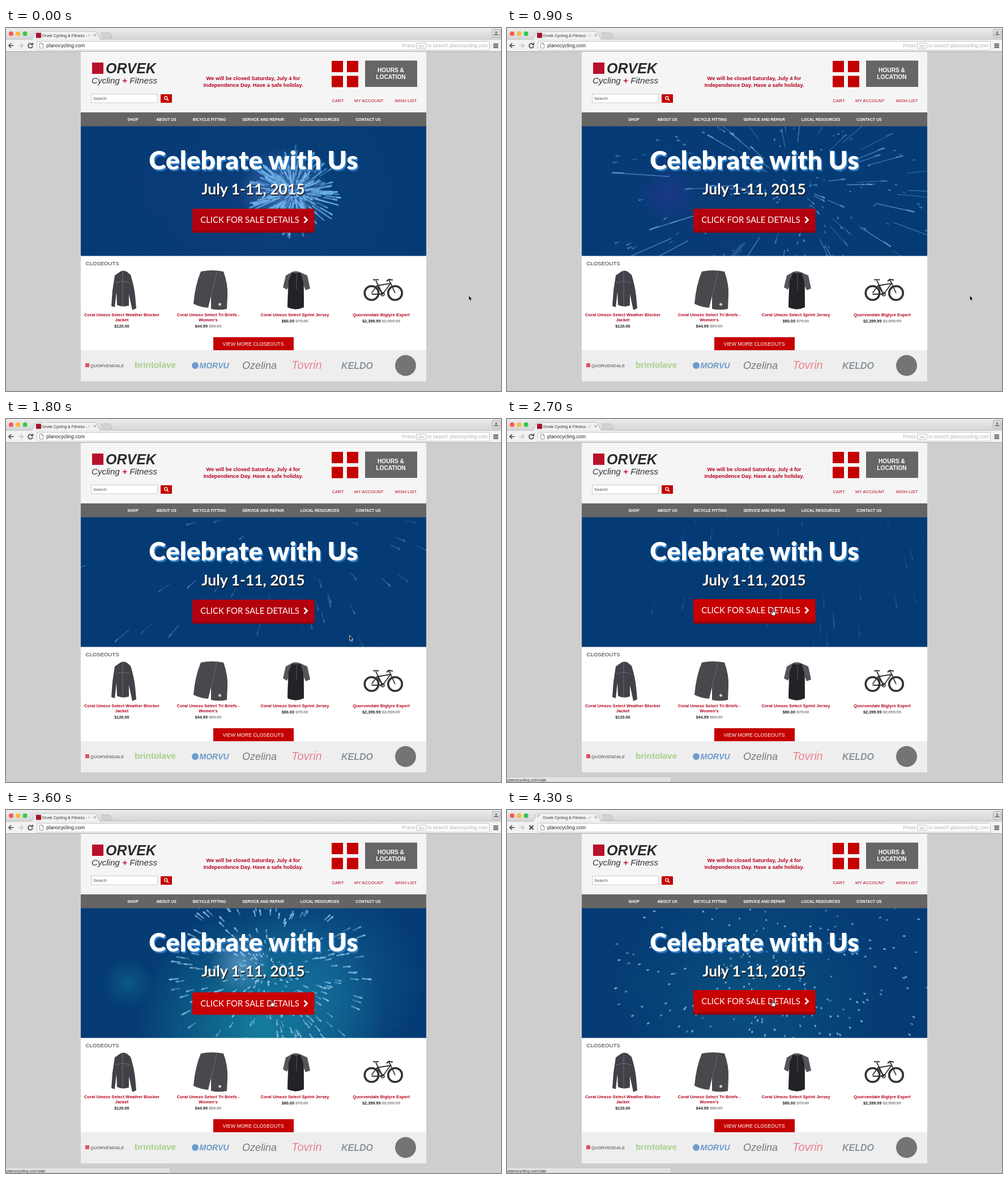
Write an HTML page with a canvas that moves like this. It is 874 px wide and 641 px high and loops after 4400 ms.

```html
<!DOCTYPE html>
<html lang="en">
<head>
<meta charset="utf-8">
<title>Orvek Cycling &amp; Fitness</title>
<style>
  html, body { margin: 0; width: 100%; height: 100%; overflow: hidden; background: #cecece; }
  canvas, svg { position: absolute; left: 0; top: 0; }
  canvas { left: 132px; top: 173px; }
  text { font-family: "Liberation Sans", Arial, sans-serif; white-space: pre; }
  .mid { text-anchor: middle; }
  .bold { font-weight: bold; }
  .red { fill: #b5001c; }
  .white { fill: #fff; }
  .line { fill: none; stroke: #444; stroke-width: 1.6; }
  .nav { font-size: 6.85px; font-weight: bold; fill: #fff; text-anchor: middle; }
  .name { font-size: 7.6px; font-weight: bold; fill: #b5001c; text-anchor: middle; }
  .price { font-size: 7.3px; font-weight: bold; fill: #222; text-anchor: middle; }
  .was { fill: #999; text-decoration: line-through; }
  .slant { font-style: italic; }
  .banner text { font-family: Lato, sans-serif; fill: #fff; text-anchor: middle; }
</style>
</head>
<body>
<canvas id="sky" width="610" height="230"></canvas>
<svg width="874" height="641" viewBox="0 0 874 641">
  <defs>
    <linearGradient id="strip" x2="0" y2="1">
      <stop stop-color="#ececec"/><stop offset="1" stop-color="#d5d5d5"/>
    </linearGradient>
  </defs>

  <!-- Browser window -->
  <rect width="874" height="20" fill="url(#strip)"/>
  <rect y="20" width="874" height="21" fill="#f2f2f2"/>
  <path d="M0 20H874" stroke="#bbb"/>
  <path d="M0 41.5H874" stroke="#aaa"/>
  <path d="M43 20.6Q47 20 49 15L51 9Q52 6 55 6H156Q159 6 160 9L163 15Q165 20 169 20.6Z" fill="#f2f2f2"/>
  <path d="M43 20Q47 20 49 15L51 9Q52 6 55 6H156Q159 6 160 9L163 15Q165 20 169 20" fill="none" stroke="#b5b5b5" stroke-width=".8"/>
  <path d="M168 8.5H182Q184 8.5 185 11L187 17.5H174Q171 17.5 170 15Z" fill="#d3d3d3" stroke="#b8b8b8" stroke-width=".8"/>
  <circle cx="9" cy="10" r="4" fill="#fc5650"/>
  <circle cx="21.3" cy="10" r="4" fill="#fdb93a"/>
  <circle cx="33.6" cy="10" r="4" fill="#33c748"/>
  <rect id="favicon" x="53" y="8.5" width="9" height="9" fill="#a5122a"/>
  <path id="spinner" d="M54 13A4 4 0 0 1 58 9" fill="none" stroke="#888" stroke-width="1.2"/>
  <text x="63" y="15.5" font-size="7.1" fill="#333">Orvek Cycling &amp; Fitness - <tspan fill="#bbb">F</tspan></text>
  <path d="M154.5 10.5l4.5 4.5m0-4.5l-4.5 4.5" stroke="#888"/>
  <rect x="858.5" y="2.5" width="14" height="14" rx="2" fill="#ddd" stroke="#aaa"/>
  <path d="M861 13q0-3 4.5-3t4.5 3z" fill="#888"/><circle cx="865.5" cy="7.7" r="2" fill="#888"/>
  <path class="line" d="M13.5 31H5m4-4l-4 4l4 4"/>
  <path class="line" d="M21.5 31H30m-4-4l4 4l-4 4" style="stroke:#c4c4c4"/>
  <path id="reload" class="line" d="M46 28.5A4 4 0 1 0 47 31.8M47.3 26v3.5h-3.5"/>
  <path id="stop" class="line" d="M39.5 27.5l7 7m0-7l-7 7" style="stroke-width:2"/>
  <rect x="54.5" y="23.5" width="799" height="15.5" rx="1.5" fill="#fff" stroke="#c2c2c2"/>
  <path d="M59.5 26.5h4l2.5 2.5v6.5h-6.5zM63.5 26.5v2.5h2.5" fill="none" stroke="#888" stroke-width=".9"/>
  <text x="71" y="34" font-size="8.9" fill="#222">planocycling.com</text>
  <g fill="#b3b3b3" font-size="8.9">
    <text x="699.5" y="34">Press</text>
    <rect x="724.5" y="26.5" width="17" height="9.5" rx="1.5" fill="none" stroke="#bbb"/>
    <text class="mid" x="733" y="33.5" font-size="7">tab</text>
    <text x="851" y="34" text-anchor="end">to search planocycling.com</text>
  </g>
  <path d="M860.5 28.3h8.5m-8.5 3h8.5m-8.5 3h8.5" stroke="#444" stroke-width="1.7"/>

  <!-- Header -->
  <rect x="132" y="42" width="610" height="107" fill="#f5f5f5"/>
  <rect x="152" y="61" width="20" height="20" fill="#b8112b"/>
  <text class="bold slant" x="176" y="80" font-size="25" fill="#2d2a2d">ORVEK</text>
  <text class="slant" x="151" y="98" font-size="15.2" fill="#333">Cycling <tspan class="bold" fill="#d0112b">+</tspan> Fitness</text>
  <rect x="150.5" y="116.5" width="117" height="15.5" fill="#fff" stroke="#ccc"/>
  <text x="154" y="127" font-size="7.6" fill="#555">Search</text>
  <rect x="273" y="117" width="20" height="15" rx="1" fill="#c40000"/>
  <path d="M284.2 125.5l2.6 2.6" stroke="#fff" stroke-width="1.5"/>
  <circle cx="282.3" cy="123.5" r="2.6" fill="none" stroke="#fff" stroke-width="1.3"/>
  <g class="mid bold red" font-size="9.35">
    <text x="436.5" y="91.5">We will be closed Saturday, July 4 for</text>
    <text x="436.5" y="104.3">Independence Day. Have a safe holiday.</text>
  </g>
  <path d="M575 58h20v20h-20zM602 58h20v20h-20zM575 84.5h20v20h-20zM602 84.5h20v20h-20z" fill="#c40000"/>
  <rect x="634" y="57.5" width="92" height="46.5" fill="#666"/>
  <g class="mid bold white" font-size="10.2">
    <text x="679.5" y="78">HOURS &amp;</text><text x="679.5" y="90.3">LOCATION</text>
  </g>
  <g class="red" font-size="7.75">
    <text x="575.5" y="130.7">CART</text><text x="615" y="130.7">MY ACCOUNT</text><text x="686.5" y="130.7">WISH LIST</text>
  </g>
  <rect x="132" y="149" width="610" height="24.5" fill="#656565"/>
  <g class="nav">
    <text x="224" y="163.5">SHOP</text><text x="283" y="163.5">ABOUT US</text>
    <text x="359" y="163.5">BICYCLE FITTING</text><text x="454" y="163.5">SERVICE AND REPAIR</text>
    <text x="554" y="163.5">LOCAL RESOURCES</text><text x="639.5" y="163.5">CONTACT US</text>
  </g>

  <!-- Banner -->
  <g class="banner">
    <text x="437" y="250" font-size="46.1" font-weight="900" style="text-shadow:2px 3px 1px #2f7cc4">Celebrate with Us</text>
    <text x="436.5" y="294" font-size="26.5" font-weight="bold" style="text-shadow:1.5px 2px 1px #222">July 1-11, 2015</text>
    <rect id="base" x="329" y="330" width="215.5" height="31.5" rx="2" fill="#94000c"/>
    <g id="button">
      <rect id="face" x="329" y="318" width="215.5" height="39.5" rx="2"/>
      <text x="430.5" y="343" font-size="14.9">CLICK FOR SALE DETAILS</text>
      <path d="M526.5 332.5l5 5.2l-5 5.2" fill="none" stroke="#fff" stroke-width="2.8"/>
    </g>
  </g>

  <!-- Products -->
  <rect x="132" y="402.5" width="610" height="166.5" fill="#fff"/>
  <text x="140.5" y="419" font-size="9.6" fill="#333">CLOSEOUTS</text>
  <g fill="#414247">
    <path d="M202 430Q207 427 213 430L220 436Q226 455 228 473L230 495L223 498L217 470L217 490Q206 494 196 489L195 466L192 493L186 491L188 464L192 437Z"/>
    <path d="M193 450L206 447L219 450M206 430V491" fill="none" stroke="#6c6e74"/>
    <path d="M344 430Q363 426 384 430Q392 452 391 472L390 496Q376 499 362 496L362 473L357 494Q343 493 331 487Q334 453 344 430Z" fill="#48484d"/>
    <path d="M372 431Q368 452 362 473" fill="none" stroke="#65666b" stroke-width="1.2"/>
    <circle cx="377.5" cy="488" r="2.5" fill="#ccc"/>
    <path d="M503 432Q512 427 521 432L532 437L537 460L529 463L526 456V493Q511 500 497 493L498 458L496 462L489 458L494 437Z" fill="#55565b"/>
    <path d="M505 432Q512 435 520 432L525 448L526 493Q511 500 497 493L499 446Z" fill="#212327"/>
    <path d="M513 435V462" stroke="#5a5b60"/>
  </g>
  <g fill="none" stroke="#333">
    <circle cx="645.5" cy="468" r="12.3" stroke-width="3.6"/>
    <circle cx="687" cy="468" r="12.3" stroke-width="3.6"/>
    <path d="M645.5 468L655 455L665 470L679 451L655 455M665 470H645.5M665 470L653 446M676 444L687 468" stroke-width="1.8"/>
    <path d="M648 444.5h10M672 447l4-3l7 1" stroke-width="2.2"/>
    <circle cx="665" cy="470" r="3" stroke-width="1.5"/>
  </g>
  <g class="name">
    <text x="204.5" y="508.5">Coral Umezo Select Weather Blocker</text><text x="204.5" y="517.5">Jacket</text>
    <text x="357" y="508.5">Coral Umezo Select Tri Briefs -</text><text x="357" y="517.5">Women's</text>
    <text x="510" y="508.5">Coral Umezo Select Sprint Jersey</text>
    <text x="662.5" y="508.5">Quorvendale Bigtyre Expert</text>
  </g>
  <g class="price">
    <text x="204.5" y="528.5">$120.00</text>
    <text x="357" y="528.5">$44.99 <tspan class="was">$60.00</tspan></text>
    <text x="510" y="519.5">$60.00 <tspan class="was">$75.00</tspan></text>
    <text x="662.5" y="519.5">$2,399.99 <tspan class="was">$2,599.99</tspan></text>
  </g>
  <rect x="366" y="546" width="142" height="23" fill="#c40000"/>
  <text class="mid white" x="436.5" y="561" font-size="8.8">VIEW MORE CLOSEOUTS</text>

  <!-- Brands -->
  <rect x="132" y="569" width="610" height="55" fill="#eee"/>
  <g class="bold slant" fill="#777">
    <rect x="140" y="592" width="7" height="7" fill="#df5266"/>
    <text x="149" y="599" font-size="7.6">QUORVENDALE</text>
    <text x="227" y="600" font-size="15.3" fill="#abcf8e" font-style="normal">brintolave</text>
    <circle cx="334" cy="596" r="6" fill="#6d9bcc"/>
    <text x="341.5" y="601" font-size="14" fill="#6d9bcc">MORVU</text>
    <text x="417" y="602" font-size="18" font-weight="normal">Ozelina</text>
    <text x="504" y="602" font-size="20" fill="#ec8090" font-weight="normal">Tovrin</text>
    <text x="592" y="602" font-size="16" fill="#88949b">KELDO</text>
    <circle cx="705.5" cy="596" r="18.5" fill="#747474"/>
  </g>

  <g id="status">
    <path d="M0 632H288Q290 632 290 634V641H0Z" fill="#e4e4e4" stroke="#bbb" stroke-width=".7"/>
    <text x="1" y="639.5" font-size="7" fill="#333">planocycling.com/sale</text>
  </g>
  <path id="arrow" d="M0 -6V3.5L2.1 1.7L3.6 5L5.2 4.3L3.7 1.1H6.5Z" fill="#111" stroke="#fff" stroke-width=".8"/>
  <path id="hand" d="M-1.5 -5Q-.6 -6 .2 -5V-1.5L3.5 -.8Q4.5 -.4 4.3 1L3.5 5H-1.5L-4.2 1Q-4 -.3 -2.8 .3L-1.5 1.2Z" fill="#fff" stroke="#222" stroke-width=".9"/>
</svg>
<script>
const LOOP = 4400, STEP = 100;
const $ = id => document.getElementById(id);
const ctx = $('sky').getContext('2d');
ctx.translate(-132, -173);
ctx.lineCap = 'round';

const show = (id, on) => $(id).style.display = on ? '' : 'none';
const place = (id, x, y) => $(id).setAttribute('transform', `translate(${x} ${y})`);
const random = n => { const v = Math.sin(n * 12.9898) * 43758.5453; return v - Math.floor(v); };

// x, y, radius, colour, time of peak, spread in time, strength
const glows = [
  [290, 270, 200, '#4a35b0', 450, 300, .5],
  [420, 375, 170, '#4a30b0', 420, 280, .55],
  [285, 295, 50, '#5230b0', 650, 450, .35],
  [520, 290, 230, '#3f78c8', 380, 300, .35],
  [490, 290, 80, '#7aa6f0', 0, 160, .5],
  [450, 385, 220, '#1b9aaa', 3600, 350, .7],
  [215, 305, 45, '#1fa0a8', 3700, 400, .3],
  [415, 270, 55, '#8fb8ea', 3550, 220, .6],
  [560, 300, 180, '#1a7fae', 3550, 300, .5],
  [430, 330, 240, '#17809a', 4200, 450, .3]
];

const bursts = [
  { x: 505, y: 290, start: -150, reach: 480, drag: 1.3, fall: 9, count: 95, seed: 1,
    trail: .5, width: 1.7, color: '#6fb0e2', power: .75, fade: .2 },
  { x: 510, y: 290, start: -150, reach: 430, drag: 1.4, fall: 12, count: 200, seed: 900,
    trail: .05, width: 2.2, color: '#70b4ec', power: .85, fade: .7 },
  { x: 465, y: 285, start: 3200, reach: 310, drag: 2.2, fall: 8, count: 330, seed: 2000,
    trail: .05, width: 2.4, color: '#86bce0', power: .85, fade: .12 }
];

function drawGlow([x, y, radius, color, peak, spread, strength], t) {
  const gradient = ctx.createRadialGradient(x, y, 0, x, y, radius);
  gradient.addColorStop(0, color);
  gradient.addColorStop(1, color + '00');
  ctx.globalAlpha = strength * Math.exp(-(((t - peak) / spread) ** 2));
  ctx.fillStyle = gradient;
  ctx.fillRect(x - radius, y - radius, radius * 2, radius * 2);
}

function drawBurst(b, t) {
  const age = (t - b.start) / 1000;
  if (age <= 0) return;
  ctx.strokeStyle = b.color;
  for (let i = 0; i < b.count; i++) {
    const n = b.seed + i * 3, angle = random(n) * Math.PI * 2;
    const speed = .08 + .92 * random(n + 1);
    const at = a => {
      const d = b.reach * speed * (1 - Math.exp(-b.drag * a));
      return [b.x + Math.cos(angle) * d, b.y + Math.sin(angle) * d + b.fall * a * a];
    };
    const streak = (trail, width) => {
      ctx.lineWidth = width;
      ctx.beginPath();
      ctx.moveTo(...at(age - Math.min(trail, age / 2)));
      ctx.lineTo(...at(age));
      ctx.stroke();
    };
    ctx.globalAlpha = b.power * Math.exp(-b.fade * age * age) * (.35 + .65 * random(n + 2));
    streak(b.trail, b.width);
    streak(b.trail / 4, b.width + .8);
  }
}

function drawSky(t) {
  ctx.globalAlpha = 1;
  ctx.fillStyle = '#053b74';
  ctx.fillRect(132, 173, 610, 230);
  glows.forEach(g => drawGlow(g, t));
  bursts.forEach(b => drawBurst(b, t));
}

function drawPage(t) {
  const u = Math.min(1, Math.max(0, (t - 1200) / 1050));
  const eased = u * u * (3 - 2 * u);
  const x = 817 - 347 * eased, y = 478 - 136 * eased - 8 * Math.sin(Math.PI * eased);
  const hover = x < 544, pressed = t >= 3500 && t < 3800, loading = t >= 3800;
  place('arrow', x, y);
  place('hand', x, y);
  show('arrow', !hover);
  show('hand', hover);
  show('status', hover);
  place('button', 0, pressed ? 4 : hover ? 0 : 1);
  show('base', !pressed);
  $('face').setAttribute('fill', hover ? '#c80000' : '#b3000e');
  show('favicon', !loading);
  show('reload', !loading);
  show('spinner', loading);
  show('stop', loading);
  $('spinner').setAttribute('transform', `rotate(${(t - 4300) * .36} 58 13)`);
}

function frame() {
  const step = Math.floor(performance.now() % LOOP / STEP) * STEP;
  const t = step < 200 ? 0 : step;
  drawSky(t);
  drawPage(t);
  requestAnimationFrame(frame);
}
frame();
</script>
</body>
</html>
```
